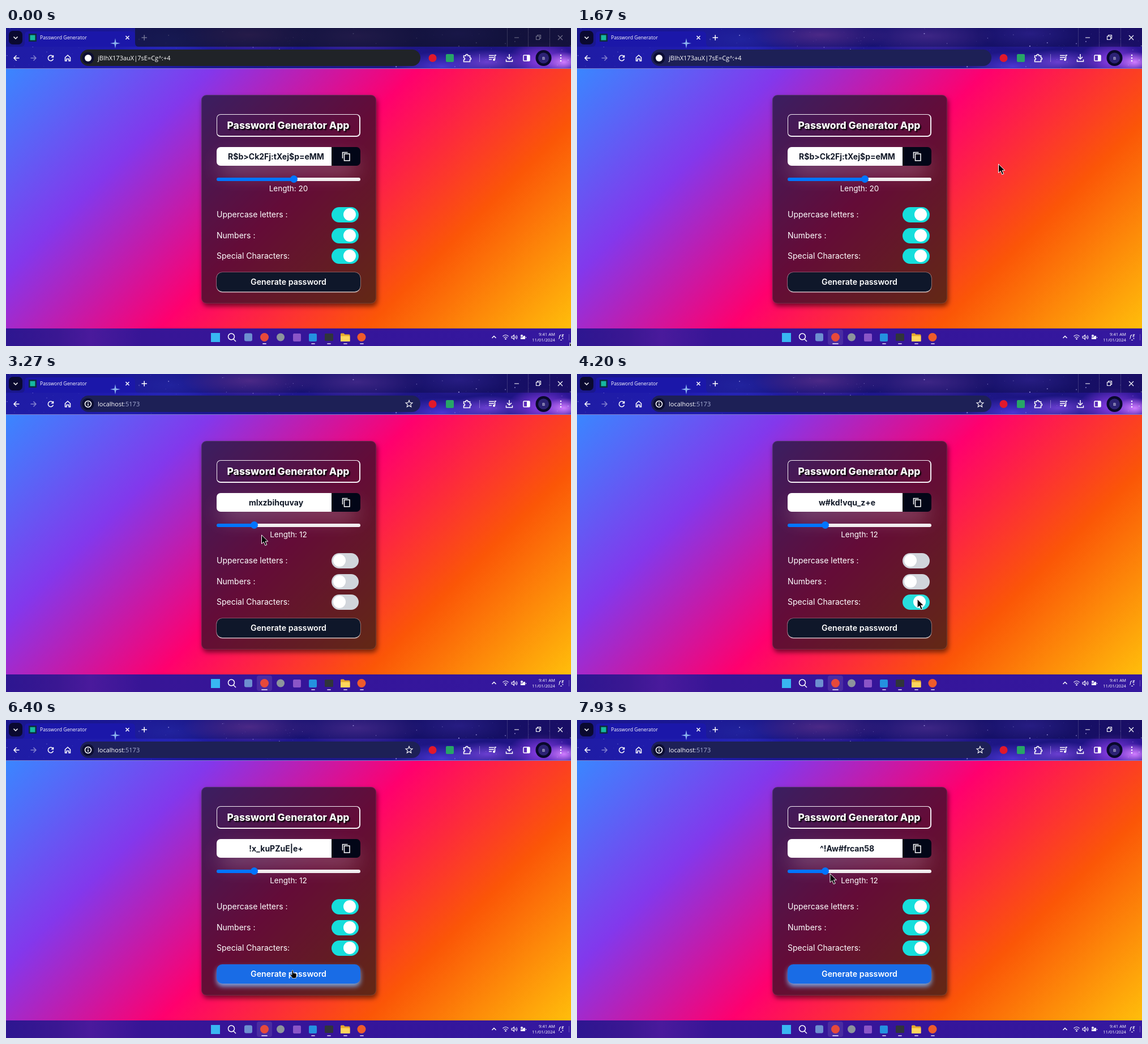
These frames come from a looping animation (998 px wide and 561 px high, 8000 ms). An HTML page:

```html
<!DOCTYPE html>
<html lang="en">
<head>
<meta charset="utf-8">
<title>Password Generator</title>
<style>
html, body { margin: 0; width: 100%; height: 100%; overflow: hidden; }
#stage { position: relative; width: 998px; height: 561px; overflow: hidden; font-family: Inter, sans-serif; color: #fff; }
#stage div, svg { position: absolute; box-sizing: border-box; }
svg { left: 0; top: 0; }
#head {
  width: 998px; height: 72px;
  background:
    radial-gradient(34px 18px at 985px 60px, #d07cff, transparent),
    radial-gradient(60px 34px at 945px 58px, #8f3fe8, transparent),
    radial-gradient(70px 22px at 850px 60px, #6a3fd0, transparent),
    radial-gradient(90px 26px at 770px 68px, #4a35d2, transparent),
    radial-gradient(120px 30px at 430px 12px, #6a38a8, transparent),
    radial-gradient(120px 30px at 620px 14px, #5a36ae, transparent),
    radial-gradient(90px 30px at 800px 10px, #3a2ab0, transparent),
    radial-gradient(110px 40px at 290px 20px, #2a2cc0, transparent),
    linear-gradient(90deg, #1f1ca4, #1f1bb0 22%, #1c1692 35%, #1f1788 65%, #1b1480 86%, #2d1596);
}
#strip { width: 998px; height: 33px; background: linear-gradient(90deg, #0b0a4a44 226px, #09083a55 500px, #09083a66 860px, #09083a88); }
#blur { left: 228px; width: 770px; height: 33px; background: #101426a0; }
#bar { left: 131px; top: 38px; width: 601px; height: 29px; border-radius: 15px; }
#page { top: 72px; width: 998px; height: 458px; background: linear-gradient(135deg, #3a86ff, #8338ec, #ff006e, #fb5607, #ffbe0b); }
#line { top: 71px; width: 998px; height: 1px; background: #7f7cc8; }
#task { top: 530px; width: 998px; height: 31px; background: linear-gradient(90deg, #2d1690, #3a1792 9%, #4a1a9c 15%, #371596 24%, #35159a 60%, #34189f); }
#card { left: 345px; top: 118px; width: 309px; height: 368px; border-radius: 9px; background: rgba(14,19,26,.64); border: 1px solid #ffffff1c; box-shadow: 2px 5px 9px #00000088; }
#title { left: 372px; top: 152px; width: 254px; height: 40px; border: solid #f4eef4; border-width: 1px 2px 2px 1px; border-radius: 7px; text-align: center; font: 800 17.5px/38px Inter, sans-serif; text-shadow: 2px 2px 2px #000; }
#field { left: 372px; top: 210px; width: 254px; height: 33px; border-radius: 7px; box-shadow: 0 16px 36px -8px #ffffff70; background: linear-gradient(90deg, #fff 203px, #020617 203px); }
#pass { left: 374px; top: 210px; width: 206px; height: 33px; text-align: center; color: #111827; font: 700 14px/33px Inter, sans-serif; white-space: pre; }
#track { left: 372px; top: 263.5px; width: 254px; height: 6px; border-radius: 3px; }
#thumb { top: 260px; width: 13px; height: 13px; border-radius: 50%; background: #0075ff; }
#len { left: 372px; top: 274px; width: 254px; text-align: center; font-size: 13.5px; line-height: 19px; }
.label { left: 372px; font-size: 14px; line-height: 20px; white-space: pre; }
.switch { left: 575px; width: 48px; height: 27px; border-radius: 14px; }
.switch div { top: 2.5px; width: 22px; height: 22px; border-radius: 50%; background: #fff; }
#gen { left: 372px; top: 431px; width: 254px; height: 34px; border-radius: 10px; text-align: center; font: 600 14.2px/33px Inter, sans-serif; }
svg text { font-family: "Open Sans", "Noto Sans", sans-serif; fill: #fff; }
.i { fill: none; stroke: #fff; stroke-width: 1.5; }
.thin { stroke-width: 1.1; }
</style>
</head>
<body>
<div id="stage">
  <div id="head"></div>
  <div id="strip"></div>
  <svg width="998" height="72"><path id="stars" fill="#c9c4ff" opacity=".6"/></svg>
  <div id="blur"></div>
  <div id="bar"></div>
  <div id="page"></div>
  <div id="line"></div>
  <div id="task"></div>
  <div id="card"></div>
  <div id="title">Password Generator App</div>
  <div id="field"></div>
  <div id="pass"></div>
  <div id="track"></div>
  <div id="thumb"></div>
  <div id="len"></div>
  <div id="gen">Generate password</div>

  <svg id="art" width="998" height="561" viewBox="0 0 998 561">
    <!-- tab strip -->
    <rect x="5" y="5" width="24" height="24" rx="7" fill="#0a0930"/>
    <path class="i" d="M13.5 15.5l3.5 3.5 3.5-3.5"/>
    <path d="M27 33q6 0 6-7V13q0-7 7-7H221q7 0 7 7V26q0 7 6 7Z" fill="#1b17a9"/>
    <path d="M193 18l1.500 7.500 7.500 1.500-7.500 1.500-1.500 7.500-1.500-7.500-7.500-1.500 7.500-1.500z" fill="#a9dcff" opacity=".8"/>
    <rect x="40" y="10" width="14" height="14" fill="#0c2b3d"/>
    <rect x="42.500" y="12.500" width="9" height="9" fill="#17b9a0"/>
    <text x="60" y="20" font-size="8.7">Password Generator</text>
    <path class="i" d="M211.500 14l6 6m0-6l-6 6"/>
    <path id="plus" class="i" d="M239.500 17h9.500m-4.750-4.750v9.500"/>
    <path class="i thin" d="M885.500 0v33M922.500 0v33M960.500 0v33" opacity=".15"/>
    <path id="wins" class="i thin" d="M898 17h8M936.500 14.500h6v6h-6zM938.500 14.500v-2h6v6h-2M975 13l8 8m0-8l-8 8"/>
    <!-- toolbar -->
    <path class="i" d="M23.500 53h-9.500m4.500-4.500L14 53l4.500 4.500"/>
    <path class="i" opacity=".45" d="M43.500 53H53m-4.500-4.500L53 53l-4.500 4.500"/>
    <path class="i" d="M83 50.500a4.700 4.700 0 1 0 .5 4M83.500 48v3.500H80"/>
    <path class="i" d="M104.500 58v-6l4.500-4 4.500 4v6H111v-3.500h-4V58z"/>
    <circle cx="145" cy="53" r="10.500" fill="#0b0d33"/>
    <circle id="engine" cx="145" cy="53" r="6" fill="#fff"/>
    <g id="site">
      <circle class="i" cx="145" cy="53" r="5.500"/>
      <path class="i" d="M145 52v4M145 49.500v1.400"/>
      <path class="i thin" d="M712 46.500l1.700 4 4.300.4-3.300 2.800 1 4.300-3.700-2.300-3.700 2.300 1-4.300-3.300-2.800 4.300-.4z"/>
    </g>
    <text x="162" y="57" font-size="11"><tspan id="url"></tspan><tspan id="port" fill="#aab0d8"></tspan></text>
    <circle cx="753.500" cy="53" r="7" fill="#e2182b"/>
    <rect x="777" y="46" width="14" height="14" rx="2" fill="#27a567"/>
    <path class="i" d="M808.500 49h3.500q0-2.500 2-2.500t2 2.500h3.500v3.500q2 0 2 1.700t-2 1.700v3.600h-11v-3.500q2 0 2-1.800t-2-1.700z"/>
    <path d="M836.500 46v14" stroke="#ffffff55"/>
    <path class="i" d="M853 48.500h9M853 52h9M853 55.500h5M863.500 56v-8h2.500"/><circle cx="862" cy="56" r="2" fill="#fff"/>
    <path class="i" d="M889 46v9m-4-4l4 4 4-4M883.500 55.500v3.500h11v-3.500"/>
    <rect class="i" x="914" y="48" width="11" height="10" rx="1"/><path d="M920 48h5v10h-5z" fill="#fff"/>
    <circle cx="949.500" cy="53" r="14" fill="#08082b"/><circle cx="949.500" cy="53" r="9.500" fill="#2c2275"/>
    <text x="949.500" y="56" font-size="8" text-anchor="middle">B</text>
    <path d="M980 48h.01M980 53h.01M980 58h.01" stroke="#fff" stroke-width="2.600" stroke-linecap="round"/>
    <!-- copy icon -->
    <path class="i" d="M594.500 230v-10.500h9M597.500 222h9.500v12h-9.500z"/>
    <!-- taskbar -->
    <rect id="lit" x="443" y="532" width="27" height="27" rx="4" fill="#fff" opacity=".1"/>
    <rect x="362" y="538" width="16" height="16" fill="#38b6f2"/>
    <circle class="i" cx="398" cy="544.500" r="5.500"/><path class="i" d="M402 549l4 4"/>
    <rect x="421" y="538.500" width="14" height="14" rx="3" fill="#6d8fd0"/>
    <circle cx="456.500" cy="545.500" r="7.500" fill="#e8493a"/>
    <circle cx="485" cy="545.500" r="7" fill="#8c949c"/>
    <rect x="507" y="539" width="14" height="14" rx="2" fill="#8a55c7"/>
    <rect x="535" y="539" width="14" height="14" rx="2" fill="#2491e0"/>
    <rect x="563" y="539" width="15" height="13" rx="1.500" fill="#30343b"/>
    <path d="M591 540q0-1.500 1.500-1.500h4l2 2h7.500q1.500 0 1.500 1.500v10h-16.500z" fill="#e5a92c"/>
    <path d="M591 543.500h16.500v9.500H591z" fill="#ffd65c"/>
    <circle cx="628" cy="545.500" r="7.500" fill="#ef5b2b"/>
    <path d="M540 557h5M568 557h5M597 557h5M626 557h5" stroke="#b9a9dc" stroke-width="1.800" stroke-linecap="round"/>
    <path id="run" stroke="#c9bdec" stroke-width="1.800" stroke-linecap="round"/>
    <path class="i" d="M858.500 547l3.500-3.500 3.500 3.500"/>
    <path class="i thin" d="M877.500 544q5-5 10 0M879.500 546.500q3-3 6 0"/><circle cx="882.500" cy="548.500" r="1.300" fill="#fff"/>
    <path class="i thin" d="M893 544h2l2.500-2.500v8L895 547h-2zM899.500 543.500q1.500 2 0 4M901.500 542q2.500 3.500 0 7"/>
    <path d="M909 543h8v6h-8zM918 545h1v2h-1z" fill="#fff"/>
    <circle cx="911" cy="543" r="2.500" fill="#fff" stroke="#34189f"/>
    <text x="970" y="543" font-size="7.700" text-anchor="end">9:41 AM</text>
    <text x="970" y="553" font-size="7.700" text-anchor="end">11/01/2024</text>
    <path class="i thin" d="M976.500 548.500q1.200-1 1.200-4 0-3 3-3M983 546.500q0 1 1 2zM979 550.500h3M982 541h2.500l-2.500 3h2.500"/>
    <path d="M994.500 540v11" stroke="#ffffff44"/>
    <!-- pointers -->
    <path id="arrow" d="M0 0V15.500L3.700 12.200 6.300 18.500 9.200 17.300 6.500 11.200H11.300Z" fill="#000" stroke="#fff" stroke-linejoin="round"/>
    <path id="hand" d="M-1.200 1q1.200-2 2.400 0V5q1.300-1 2 .3 1.300-.8 2 .4 1.500-.4 1.800 1V9.500q0 1.500-1 3V14H-.8V12.700L-4 8.800q-.6-1.700 1-1.500L-1.200 8.500Z" fill="#000" stroke="#fff" stroke-width=".7"/>
  </svg>
</div>
<script>
const $ = id => document.getElementById(id);
const clamp = v => Math.max(0, Math.min(1, v));
const ease = v => (v = clamp(v), v * v * (3 - 2 * v));
const show = (id, on) => $(id).style.display = on ? '' : 'none';
const mix = (a, b, u) => `rgb(${a.map((v, i) => v + (b[i] - v) * u)})`;

const RESET = 1800, FOCUS = 1400;
const passwords = [
  [0, 'R$b>Ck2Fj:tXej$p=eMM'], [RESET, 'mlxzbihquvay'], [4080, 'w#kd!vqu_z+e'],
  [4500, 'k7!u_x2e$w9q'], [5020, '!x_kuPZuE|e+'], [6800, 'F@D6%o1L=D&A'],
  [7270, 'uB7$kXq!3nRz'], [7670, '^!Aw#frcan58']
];
const path = [
  [0, 996, 555], [70, 996, 555], [400, 744, 294], [800, 744, 294], [1200, 744.5, 240],
  [1870, 744.5, 240], [2200, 603, 228], [2400, 562, 231], [2530, 540, 240], [2730, 475, 272],
  [3270, 451.5, 284], [3670, 451.5, 284], [3980, 601, 401], [4150, 601, 401], [4400, 602, 365],
  [4560, 602, 365], [4900, 604.5, 326], [5530, 604.5, 326], [5870, 612, 333], [6300, 510, 441],
  [6500, 502.5, 442], [7650, 502.5, 442], [7930, 447, 271], [8000, 447, 271]
];

function add(cls, top, parent, before = null) {
  const el = document.createElement('div');
  el.className = cls;
  if (top) el.style.top = top + 'px';
  return parent.insertBefore(el, before);
}

const switches = [['Uppercase letters :', 329, 5035], ['Numbers :', 366, 4500], ['Special Characters:', 402, 4080]]
  .map(([text, y, on]) => {
    add('label', y - 10.5, $('stage'), $('art')).textContent = text;
    const box = add('switch', y - 13.5, $('stage'), $('art'));
    return { box, knob: add('', 0, box), on };
  });

let seed = 11;
const rnd = () => (seed = seed * 16807 % 2147483647) / 2147483647;
let d = '';
for (let i = 0; i < 170; i++) {
  const s = 0.4 + rnd() ** 5 * 1.6;
  d += `M${rnd() * 998} ${rnd() * 72}h${s}v${s}h${-s}z`;
}
$('stars').setAttribute('d', d);

function pointer(t) {
  const i = Math.max(1, path.findIndex(k => k[0] > t));
  const [a, x, y] = path[i - 1], [b, x2, y2] = path[i];
  const u = ease((t - a) / (b - a));
  return [x + (x2 - x) * u, y + (y2 - y) * u];
}

function draw(t) {
  const fresh = t >= RESET, focused = t >= FOCUS;
  show('blur', !focused);
  $('plus').style.opacity = $('wins').style.opacity = focused ? 1 : 0.4;
  $('bar').style.background = focused ? '#1d2056' : '#202328';
  show('engine', !fresh);
  show('site', fresh);
  $('url').textContent = fresh ? 'localhost' : 'jBIhX173auX|7sE=Cg^:+4';
  $('port').textContent = fresh ? ':5173' : '';
  show('lit', t >= 900);
  $('run').setAttribute('d', t >= 900 ? 'M452 557h9' : 'M454 557h5');

  $('pass').textContent = passwords.filter(p => p[0] <= t).pop()[1];
  const x = fresh ? 66 : 136;
  $('track').style.background = `linear-gradient(90deg, #0075ff ${x}px, #f1edef ${x}px)`;
  $('thumb').style.left = 372 + x - 6.5 + 'px';
  $('len').textContent = 'Length: ' + (fresh ? 12 : 20);
  for (const s of switches) {
    const u = fresh ? ease((t - s.on) / 150) : 1;
    s.box.style.background = mix([209, 213, 219], [22, 222, 220], u);
    s.knob.style.left = 2.5 + 18 * u + 'px';
  }

  const h = ease((t - 6170) / 150), g = $('gen').style;
  g.background = mix([15, 23, 42], [25, 108, 230], h);
  g.boxShadow = `0 0 0 .6px rgba(255,255,255,${0.5 * (1 - h)}), 0 1.5px 1px rgba(255,255,255,${0.65 * (1 - h)}), 0 5px 9px rgba(130,190,255,${0.85 * h})`;

  const [px, py] = pointer(t);
  const hand = t > 2100 && t < 2480 || t > 6170 && t < 7720;
  show('hand', hand);
  show('arrow', !hand);
  $(hand ? 'hand' : 'arrow').setAttribute('transform', `translate(${px} ${py})`);
}

function tick() {
  draw(performance.now() % 8000);
  requestAnimationFrame(tick);
}
tick();
</script>
</body>
</html>
```
